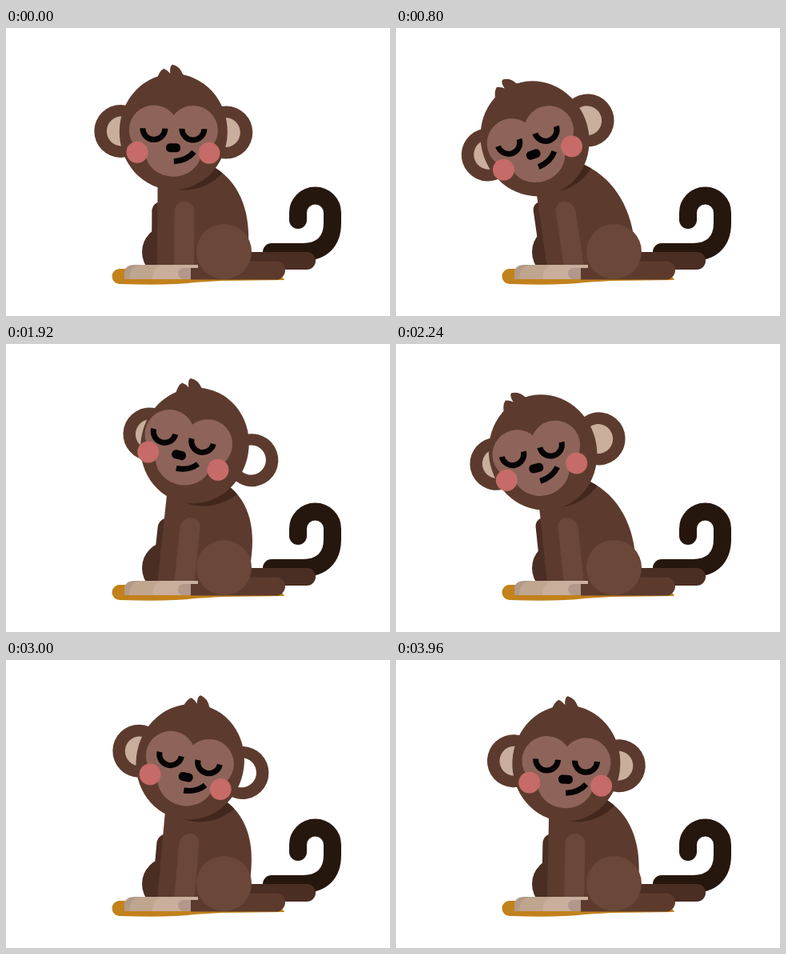
Write an HTML page that moves like this. It is 480 px wide and 360 px high and loops after 4 s.

```html
<!DOCTYPE html>
<html lang="en">
<head>
<meta charset="utf-8">
<title>Swaying monkey</title>
<style>
  html, body { margin: 0; width: 100%; height: 100%; overflow: hidden; background: #fff; }
  svg { display: block; width: 100vw; height: 100vh; }
  .fur { fill: #5c3b2e; }
  .dark { fill: #4a2d23; }
  .light { fill: #6b4739; }
  .tan { fill: #c9ae9c; }
  .mask { fill: #8e645a; }
  .cheek { fill: #c66b67; }
  .line { fill: none; stroke: #050303; stroke-width: 7; }
</style>
</head>
<body>
<svg viewBox="0 0 480 360">
  <defs>
    <path id="torso" d="M189 180V302H303V262C303 223 288 184 247 168Z"/>
    <clipPath id="torsoClip"><use id="clipShape" href="#torso"/></clipPath>
  </defs>

  <path d="M332 280H371C396 280 408 266 408 244V231A21.5 21.5 0 0 0 365 231V240"
        fill="none" stroke="#26170e" stroke-width="22" stroke-linecap="round"/>
  <path d="M142 301H240V312H346L348 315L270 316L236 318Q205 322 142 320A9.5 9.5 0 0 1 142 301Z" fill="#c2811b"/>
  <rect class="dark" x="280" y="280" width="107" height="22" rx="11"/>
  <circle class="dark" cx="203" cy="280" r="33"/>

  <g id="rearArm"><rect class="dark" x="182" y="217" width="24" height="84" rx="12"/></g>
  <g id="body"><use href="#torso" class="fur"/></g>
  <g clip-path="url(#torsoClip)"><ellipse id="shade" cx="14" rx="67.5" ry="72.5" fill="#43271d"/></g>
  <g id="arm"><path class="light" d="M210 302V229.500A12.500 12.500 0 0 1 235 229.500V302Z"/></g>

  <path d="M148 314V304Q150 296 160 296H235V314Z" fill="#b29a87"/>
  <path d="M154 314Q154 296 171 296H235V314Z" fill="#c0a58f"/>
  <path class="tan" d="M183 314Q184 296 198 296H240V314Z"/>
  <path d="M231 314H222A7 7 0 0 1 222 300H235V314Z" fill="#b3978a"/>
  <path class="fur" d="M231 300H290V291.500H337.500A11.500 11.500 0 0 1 337.500 314.500H231Z"/>
  <circle class="light" cx="272.500" cy="279.500" r="34.500"/>

  <g id="head">
    <g id="ears">
      <circle class="fur" cx="-66" r="33"/>
      <circle class="fur" cx="66" r="33"/>
      <circle class="tan" cx="-65" r="18.500"/>
      <circle id="rightInner" cx="65" r="18.500"/>
    </g>
    <path id="tuft" class="fur" d="M-22 -64Q-19 -76 -13 -79Q-8 -77 -5 -73Q-6 -83 -2 -84Q7 -82 11 -72L20 -62Z"/>
    <ellipse class="fur" rx="67.500" ry="72.500"/>
    <g id="face">
      <g class="mask">
        <circle cx="-24.500" cy="-2" r="31"/>
        <circle cx="24.500" cy="-2" r="31"/>
        <ellipse cy="25" rx="35" ry="31"/>
      </g>
      <circle class="cheek" cx="-45" cy="26" r="13.500"/>
      <circle class="cheek" cx="45" cy="26" r="13.500"/>
      <g id="features">
        <path class="line" d="M-38.500 -4A14 14 0 0 0 -10.500 -4M10.500 -4A14 14 0 0 0 38.500 -4M1 37Q17 36 26 25"/>
        <rect x="-9" y="14.500" width="18" height="11" rx="5" fill="#050303"/>
      </g>
    </g>
  </g>
</svg>
<script>
const LOOP = 4000, LEFT = -19, RIGHT = 15.5;
const el = id => document.getElementById(id);
const move = (id, transform) => el(id).setAttribute('transform', transform);

// Eased step from 0 to 1 between two times
function ease(t, start, end) {
  const u = Math.min(1, Math.max(0, (t - start) / (end - start)));
  return (1 - Math.cos(Math.PI * u)) / 2;
}

// Two sways right and back; the last return runs over the loop's seam
function tiltAt(time) {
  const t = time < 600 ? time + LOOP : time;
  const side = ease(t, 950, 1600) - ease(t, 1860, 2370) + ease(t, 2620, 3100) - ease(t, 3500, 4600);
  return LEFT + (RIGHT - LEFT) * side;
}

const turnAt = t => 24.5 * (ease(t, 0, 1650) - ease(t, 1700, 3300));

function draw(t) {
  const tilt = tiltAt(t), turn = turnAt(t);

  const lean = -Math.tan(0.43 * tilt * Math.PI / 180);
  const skew = `matrix(1 0 ${lean} 1 ${-300 * lean} 0)`;
  for (const id of ['rearArm', 'body', 'arm', 'clipShape']) move(id, skew);

  const x = 208 + 1.85 * tilt + 0.06 * turn;
  const y = 130 - 0.308 * tilt + 0.0067 * tilt * tilt;
  const pose = `translate(${x} ${y}) rotate(${tilt})`;
  move('head', pose);
  move('shade', pose);

  // Layers slide by depth as the head turns
  move('face', `translate(${-0.4 * turn} ${-0.16 * turn})`);
  move('features', `translate(${-0.3 * turn} 0)`);
  move('ears', `translate(${0.33 * turn} 0)`);
  move('tuft', `rotate(${-0.7 * turn})`);

  // The inner right ear is see-through while the head is upright or to the right
  el('rightInner').setAttribute('fill', tilt > -5 && t > 600 && t < 3800 ? '#fff' : '#c9ae9c');
}

function tick() {
  draw(Math.floor(performance.now() % LOOP / 40) * 40);
  requestAnimationFrame(tick);
}
tick();
</script>
</body>
</html>
```
